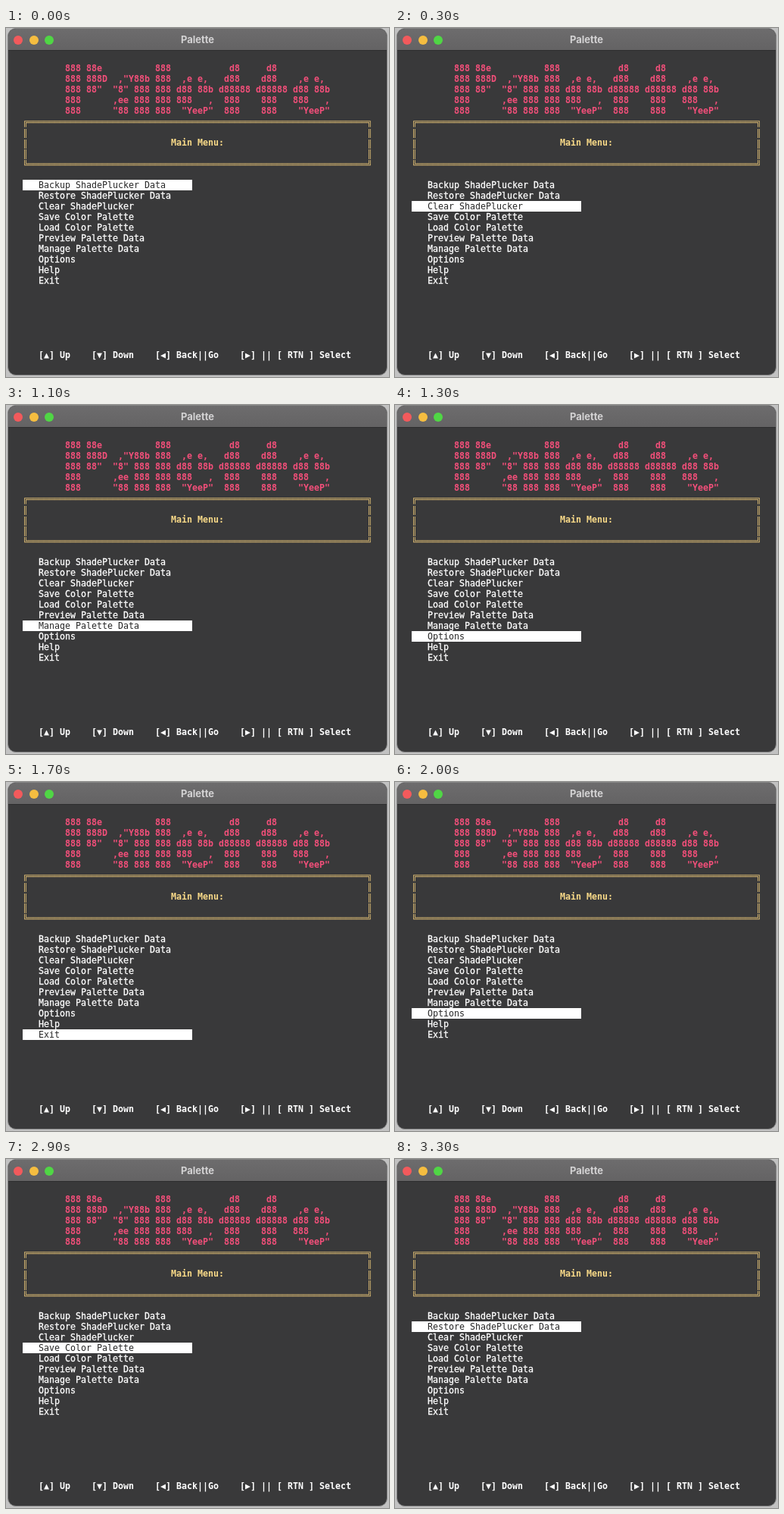
Animation, 506 px wide and 460 px high, one loop 3400 ms. Source, as an HTML page:

```html
<!DOCTYPE html>
<html lang="en">
<head>
<meta charset="utf-8">
<title>Palette</title>
<style>
html, body { margin: 0; width: 100%; height: 100%; overflow: hidden; background: #c2c2c2; }
#window {
  position: absolute; left: 2px; top: 0; width: 502px; height: 458px;
  box-sizing: border-box; border: 1px solid #858585; border-radius: 11px;
  background: #39393a; overflow: hidden;
}
#bar {
  position: absolute; inset: 0 0 auto; height: 28px;
  background: linear-gradient(#6d6c6d, #646364); border-bottom: 1px solid #2e2e2f;
}
#title {
  position: absolute; left: 0; top: 0; width: 506px; height: 31px;
  font: 700 13px/31px Inter, sans-serif; text-align: center; color: #d3d2d3;
}
.light { position: absolute; top: 10px; width: 12px; height: 12px; border-radius: 50%; }
pre {
  position: absolute; left: 22px; margin: 0; color: #fff;
  font: 11.63px/14px "DejaVu Sans Mono", monospace; font-variant-ligatures: none;
}
.bold { font-weight: bold; }
#logo { top: 46px; color: #f34f7a; }
#frame, #heading { color: #f9da88; }
#frame { top: 116.5px; color: #d9b973; }
/* Thin breaks between the text rows of the border. */
#frame::after {
  content: ""; position: absolute; inset: 0;
  background: repeating-linear-gradient(#39393a 0 1.5px, transparent 1.5px 14px);
}
#heading { top: 144px; }
#menu { top: 200px; -webkit-text-stroke: .3px; }
#menu span { display: block; width: 224px; height: 14px; }
#menu .selected { background: #fff; color: #262626; -webkit-text-stroke: 0; }
#keys { top: 424px; }
</style>
</head>
<body>
<div id="window"><div id="bar"></div></div>
<div id="title">Palette</div>
<i class="light" style="left:10px;background:#f25a5c"></i>
<i class="light" style="left:31px;background:#f5bd40"></i>
<i class="light" style="left:51px;background:#50d645"></i>
<pre id="logo" class="bold">
        888 88e          888           d8     d8
        888 888D  ,"Y88b 888  ,e e,   d88    d88    ,e e,
        888 88"  "8" 888 888 d88 88b d88888 d88888 d88 88b
        888      ,ee 888 888 888   ,  888    888   888   ,
        888      "88 888 888  "YeeP"  888    888    "YeeP"</pre>
<pre id="frame" class="bold"></pre>
<pre id="heading" class="bold">                            Main Menu:</pre>
<pre id="menu"></pre>
<pre id="keys" class="bold">   [▲] Up    [▼] Down    [◀] Back||Go    [▶] || [ RTN ] Select</pre>
<script>
const LOOP = 3400;
const LABELS = [
  "Backup ShadePlucker Data", "Restore ShadePlucker Data", "Clear ShadePlucker",
  "Save Color Palette", "Load Color Palette", "Preview Palette Data",
  "Manage Palette Data", "Options", "Help", "Exit"
];
// Start times of the rows on the way back up, from "Help" to "Restore".
const UPWARD = [1800, 2000, 2200, 2500, 2700, 2900, 3100, 3300];

const line = "═".repeat(64), gap = " ".repeat(64);
document.getElementById("frame").textContent =
  [`╔${line}╗`, ...Array(3).fill(`║${gap}║`), `╚${line}╝`].join("\n");

const menu = document.getElementById("menu");
const rows = LABELS.map(label => {
  const row = document.createElement("span");
  row.textContent = "   " + label;
  return menu.appendChild(row);
});

function selectedAt(time) {
  if (time < UPWARD[0]) return Math.floor((time + 100) / 200);
  return 9 - UPWARD.filter(start => start <= time).length;
}

const startTime = performance.now();
function draw(now) {
  const selected = selectedAt(Math.max(0, now - startTime) % LOOP);
  rows.forEach((row, i) => row.classList.toggle("selected", i === selected));
  requestAnimationFrame(draw);
}
draw(startTime);
</script>
</body>
</html>
```
